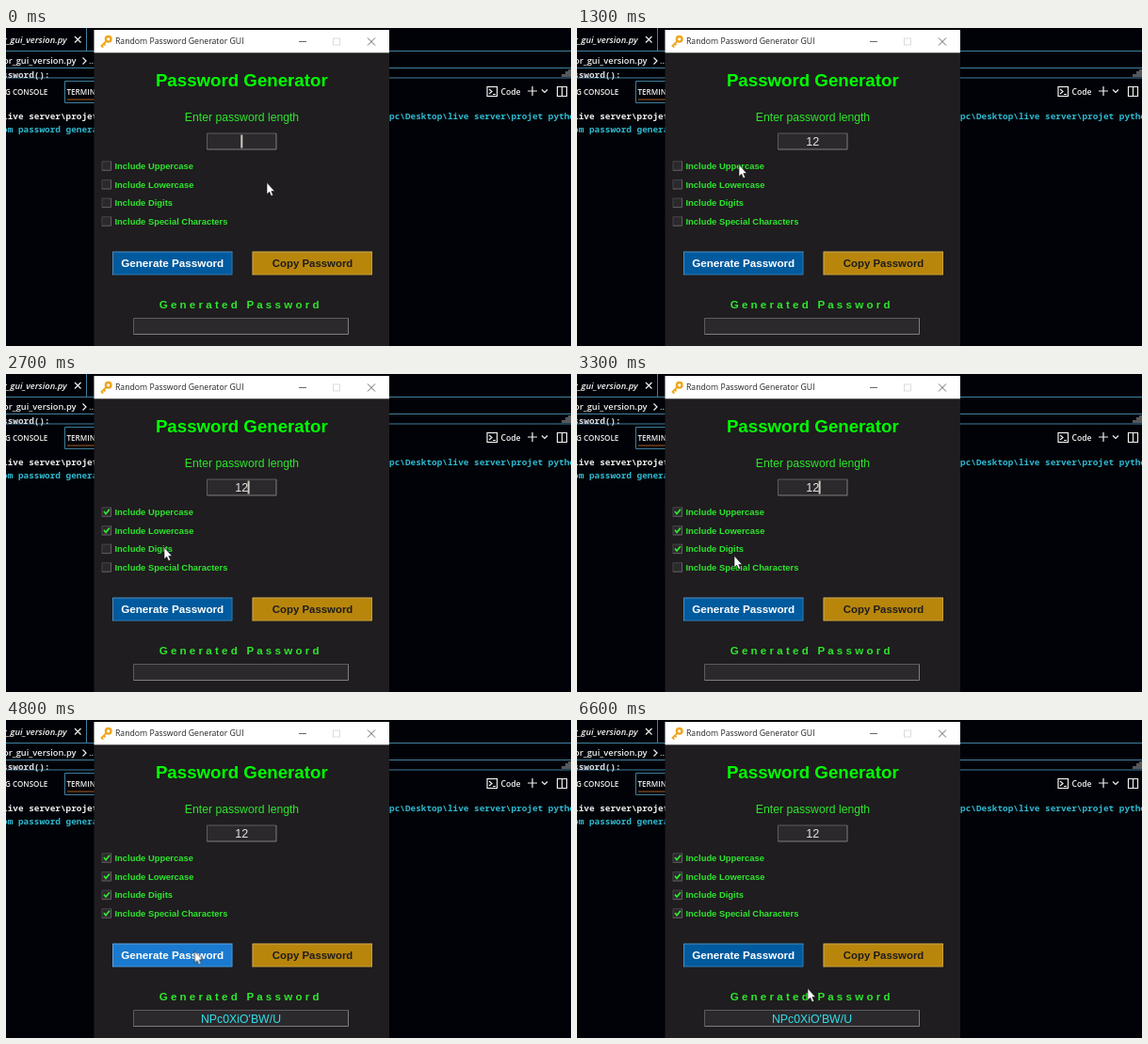
An HTML page that plays this animation: 600 by 338 pixels, repeating every 6.8 s.

```html
<!DOCTYPE html>
<html lang="en">
<head>
<meta charset="utf-8">
<title>Password Generator</title>
<style>
  html, body { margin: 0; width: 100%; height: 100%; overflow: hidden; background: #010207; }
  svg { display: block; width: 100%; height: 100%; }
  text { font-family: "Liberation Sans", Arial, sans-serif; white-space: pre; }
  .ui { font-family: "Open Sans", "Noto Sans", sans-serif; fill: #f2f2f2; }
  .mono { font-family: "Noto Sans Mono", "DejaVu Sans Mono", monospace; font-size: 9.4px; font-weight: 600; }
  .bold { font-weight: bold; }
  .semi { font-weight: 600; }
  .mid { text-anchor: middle; }
  .line { fill: none; stroke: #f0f0f0; stroke-width: 1.2; }
  .edge { fill: none; stroke: #3f7f9f; }
  .green { fill: #2ee62e; }
  .cyan { fill: #2fb9d0; }

  .anim { animation: 6.8s step-end infinite; }
  .one { animation-name: one; }
  .twelve { animation-name: twelve; }
  .upper { animation-name: upper; }
  .lower { animation-name: lower; }
  .digits { animation-name: digits; }
  .special { animation-name: special; }
  .result { animation-name: result; }
  .generate { fill: #005a9e; animation-name: generate; }
  .copy { fill: #b8860b; animation-name: copy; }
  .caret-x { animation-name: caret-x; }
  .caret { animation-name: blink; }
  .pointer { animation-name: pointer; }

  @keyframes one { 0%, 8.82% { opacity: 0 } 5.88% { opacity: 1 } 100% { opacity: 0 } }
  @keyframes twelve { 0% { opacity: 0 } 8.82%, 100% { opacity: 1 } }
  @keyframes upper { 0% { opacity: 0 } 22.05%, 100% { opacity: 1 } }
  @keyframes lower { 0% { opacity: 0 } 35.29%, 100% { opacity: 1 } }
  @keyframes digits { 0% { opacity: 0 } 42.64%, 100% { opacity: 1 } }
  @keyframes special { 0% { opacity: 0 } 52.94%, 100% { opacity: 1 } }
  @keyframes result { 0% { opacity: 0 } 69.11%, 100% { opacity: 1 } }
  @keyframes generate { 0%, 73.52%, 100% { fill: #005a9e } 61.76% { fill: #1a7ad0 } }
  @keyframes copy { 0%, 88.23%, 100% { fill: #b8860b } 75% { fill: #ffd700 } }
  @keyframes caret-x {
    0% { transform: translateX(250.3px) }
    5.88% { transform: translateX(254px) }
    8.82%, 100% { transform: translateX(257.6px) }
  }
  @keyframes blink {
    0%, 22.05%, 35.29%, 48.52%, 61.76%, 75%, 88.23% { opacity: 1 }
    17.64%, 30.88%, 44.11%, 57.35%, 70.58%, 83.82%, 97.05%, 100% { opacity: 0 }
  }
  @keyframes pointer {
    0% { transform: translate(277px, 165px) }
    4.41% { transform: translate(277px, 165px); animation-timing-function: steps(4) }
    10.29% { transform: translate(242px, 165px); animation-timing-function: steps(6) }
    19.11% { transform: translate(172px, 146px) }
    23.52% { transform: translate(172px, 146px); animation-timing-function: steps(5) }
    30.88% { transform: translate(170px, 168px) }
    35.29% { transform: translate(170px, 168px); animation-timing-function: steps(3) }
    39.7% { transform: translate(168px, 185px) }
    45.58% { transform: translate(168px, 185px); animation-timing-function: steps(2) }
    48.52% { transform: translate(167px, 194px); animation-timing-function: steps(2) }
    51.47% { transform: translate(168px, 205px) }
    55.88% { transform: translate(168px, 205px); animation-timing-function: steps(5) }
    63.23% { transform: translate(178px, 247px) }
    69.11% { transform: translate(178px, 247px); animation-timing-function: steps(5) }
    76.47% { transform: translate(290px, 244px) }
    82.35% { transform: translate(290px, 244px); animation-timing-function: steps(7) }
    92.64%, 100% { transform: translate(245px, 286px) }
  }
</style>
</head>
<body>
<svg viewBox="0 0 600 338">
  <defs>
    <g id="box">
      <rect width="10.5" height="10.5" fill="#2b292c"/>
      <path d="M.5 10.5V.5H10.5" fill="none" stroke="#454346"/>
      <path d="M.5 10H10V.5" fill="none" stroke="#626062"/>
    </g>
    <path id="tick" d="M2.5 4.8L4.5 7.4L8.4 2.6" fill="none" stroke="#32e632" stroke-width="1.7"/>
    <g id="bevel" fill="none">
      <path d="M.5 25V.5H127.5" stroke="#fff" stroke-opacity=".3"/>
      <path d="M.5 24.5H127V.5" stroke="#fff" stroke-opacity=".2"/>
    </g>
  </defs>

  <!-- editor -->
  <rect width="600" height="338" fill="#010207"/>
  <g class="edge">
    <path d="M85.5 0V24.5M0 24.5H94M407 24.5H600M0 42.5H94M407 42.5H600M0 53H94M407 53H600"/>
    <path d="M94 56.5H62.5V79.5H94"/>
  </g>
  <path d="M65 76H94" stroke="#a85c20"/>
  <path d="M590 52V49H594V46H597V44H600V52Z" fill="#55585c"/>
  <text class="ui semi" x="-3" y="15.8" font-size="9.4" font-style="italic">r_gui_version.py</text>
  <path class="line" d="M73 9L79.5 15.5M79.5 9L73 15.5" stroke-width="1.5"/>
  <text class="ui semi" x="-3" y="38" font-size="9.3">or_gui_version.py</text>
  <path class="line" d="M81.5 31.5L85 35L81.5 38.5"/>
  <text class="ui" x="88" y="38" font-size="9.3">...</text>
  <text class="mono" x="-4" y="52.5" fill="#dcdfe6">ssword():</text>
  <text class="ui semi" x="-1" y="71" font-size="8.1">G CONSOLE</text>
  <text class="ui semi" x="64.5" y="71" font-size="8.1">TERMINAL</text>
  <text class="mono" x="-4" y="97" fill="#eee">live server\projet</text>
  <text class="mono cyan" x="-4" y="111">om password genera</text>
  <text class="mono cyan" x="407" y="97">pc\Desktop\live server\projet python</text>

  <g class="line">
    <rect x="511" y="62.5" width="10.5" height="10"/>
    <path d="M513 65L516 67.5L513 70M517 70.5H520"/>
    <path d="M554 67H564M559 62V72M569 65.5L572 68.5L575 65.5"/>
    <path d="M585.5 62.5H595.5V72.5H585.5ZM590.5 62.5V72.5"/>
  </g>
  <text class="ui semi" x="525.5" y="71" font-size="8.6">Code</text>

  <!-- window -->
  <rect x="93.5" y="2" width="313.5" height="336" fill="#1f1d1f"/>
  <rect x="93.5" y="2" width="313.5" height="24.3" fill="#fff"/>
  <g fill="none" stroke="#efa51c">
    <circle cx="108.7" cy="11.8" r="2.8" stroke-width="2.4"/>
    <path d="M106.5 14L100.8 19.7M103.8 16.7L105.5 18.4M101.6 18.9L103.3 20.6" stroke-width="1.8"/>
  </g>
  <text class="ui" x="116" y="17.3" font-size="8.7" style="fill:#222">Random Password Generator GUI</text>
  <g fill="none" stroke="#444" stroke-width=".8">
    <path d="M311 14.5H319M384 10.5L392 18.5M392 10.5L384 18.5"/>
    <rect x="347.5" y="11" width="7" height="7" stroke="#d4d4d4"/>
  </g>

  <text class="bold mid" x="250.3" y="62.3" font-size="18.7" fill="#0f0">Password Generator</text>
  <text class="mid green" x="250.5" y="99" font-size="12.2">Enter password length</text>

  <rect x="213.5" y="112" width="73.5" height="17" fill="#2b292c"/>
  <path d="M213.5 129V112H287" fill="none" stroke="#5d5b5d"/>
  <path d="M213.5 129H287V112" fill="none" stroke="#807e80"/>
  <g class="mid" font-size="12.6" fill="#e4e4e4">
    <text class="anim one" x="250.3" y="125">1</text>
    <text class="anim twelve" x="250.3" y="125">12</text>
  </g>
  <g class="anim caret-x"><rect class="anim caret" x="-.8" y="113.5" width="1.6" height="14" fill="#f4f4e8"/></g>

  <g class="bold green" font-size="9.4">
    <text x="115.5" y="150">Include Uppercase</text>
    <text x="115.5" y="169.7">Include Lowercase</text>
    <text x="115.5" y="189.2">Include Digits</text>
    <text x="115.5" y="209">Include Special Characters</text>
  </g>
  <use href="#box" x="101.5" y="141.3"/>
  <use href="#box" x="101.5" y="161"/>
  <use href="#box" x="101.5" y="180.6"/>
  <use href="#box" x="101.5" y="200.2"/>
  <g class="anim upper"><use href="#tick" x="101.5" y="141.3"/></g>
  <g class="anim lower"><use href="#tick" x="101.5" y="161"/></g>
  <g class="anim digits"><use href="#tick" x="101.5" y="180.6"/></g>
  <g class="anim special"><use href="#tick" x="101.5" y="200.2"/></g>

  <rect class="anim generate" x="113" y="237.5" width="127.5" height="25"/>
  <use href="#bevel" x="113" y="237.5"/>
  <text class="bold mid" x="176.7" y="254.2" font-size="11.7" fill="#fff">Generate Password</text>
  <rect class="anim copy" x="261.5" y="237.5" width="127.5" height="25"/>
  <use href="#bevel" x="261.5" y="237.5"/>
  <text class="bold mid" x="325.6" y="254.2" font-size="11.4" fill="#1e1c1e">Copy Password</text>

  <text class="bold mid green" x="247.6" y="298.3" font-size="11.6">G e n e r a t e d   P a s s w o r d</text>
  <rect x="135.5" y="308.5" width="228" height="17" fill="#2b292c"/>
  <path d="M135.5 325.5V308.5H363.5" fill="none" stroke="#5d5b5d"/>
  <path d="M135.5 325.5H363.5V308.5" fill="none" stroke="#807e80"/>
  <text class="anim result mid" x="249.5" y="321.8" font-size="12.3" fill="#2fdfe8">NPc0XiO'BW/U</text>

  <path class="anim pointer" d="M0-.7V11.8L2.7 9.2L4.6 13.6L6.7 12.7L4.8 8.5H8.4Z" fill="#fff" stroke="#111" stroke-width=".6"/>
</svg>
</body>
</html>
```
